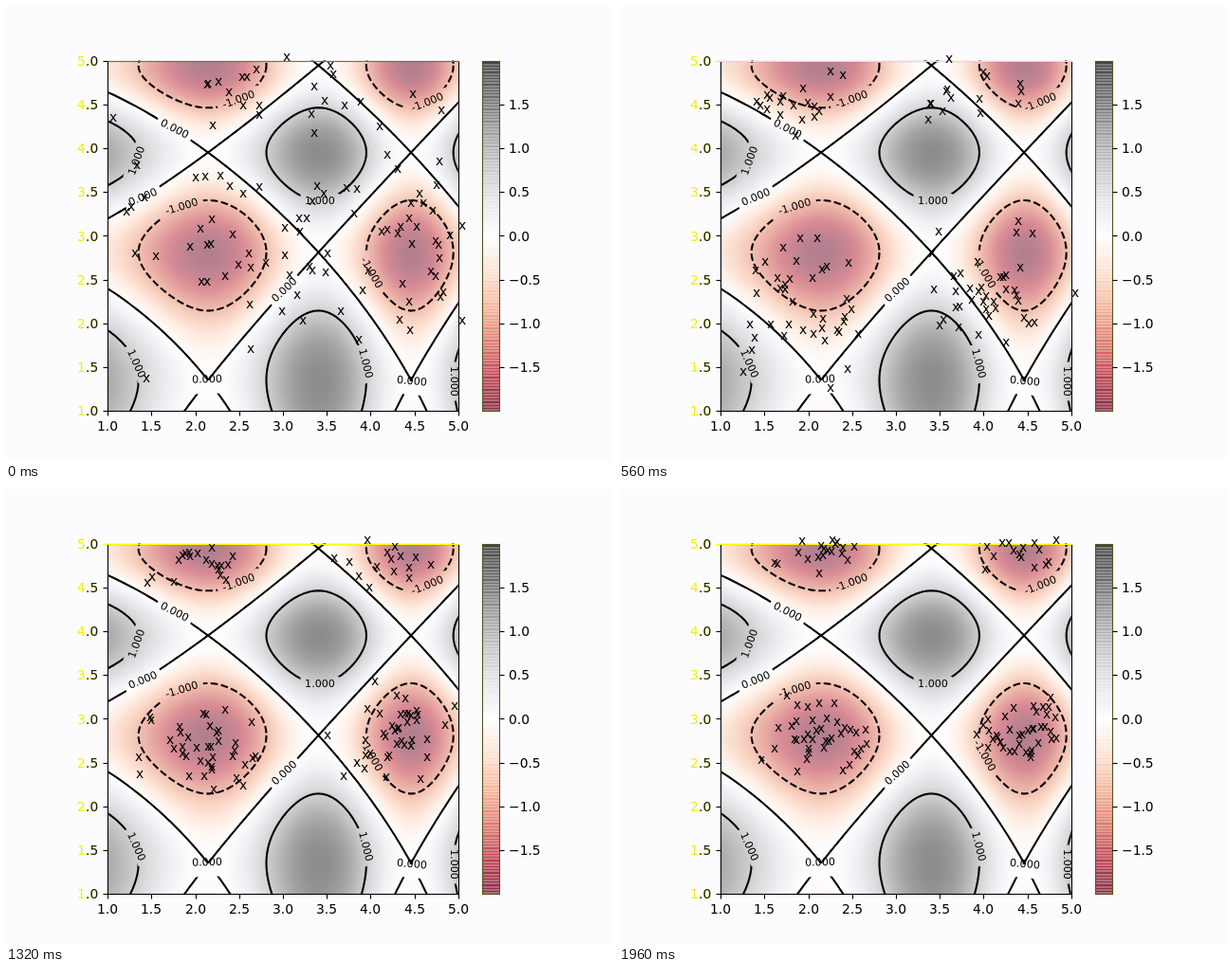
Write an HTML page with a canvas that moves like this. It is 640 px wide and 480 px high and loops after 2000 ms.

```html
<!DOCTYPE html>
<html lang="en">
<head>
<meta charset="utf-8">
<title>Swarm on a contour plot</title>
<style>
html, body { margin: 0; width: 100%; height: 100%; overflow: hidden; background: #fcfcff; }
canvas { position: absolute; left: 0; top: 0; }
</style>
</head>
<body>
<canvas id="plot" width="640" height="480"></canvas>
<canvas id="swarm" width="640" height="480"></canvas>
<script>
const g = document.getElementById('plot').getContext('2d');
const s = document.getElementById('swarm').getContext('2d');
const { PI, sin, cos, asin, floor, round, max, min, SQRT1_2 } = Math;
const FONT = '"DejaVu Sans", Verdana, sans-serif';
const LEFT = 107.2, TOP = 57.6, SIZE = 369.6, UNIT = SIZE / 4;
const px = x => LEFT + (x - 1) * UNIT;
const py = y => TOP + SIZE - (y - 1) * UNIT;
const lerp = (a, b, t) => a + (b - a) * t;

// Red to grey colour scale over -2..2
const stops = ['67001f', 'b2182b', 'd6604d', 'f4a582', 'fddbc7', 'ffffff',
  'e0e0e8', 'bababf', '878787', '4d4d4d', '1a1a1a']
  .map(h => [0, 2, 4].map(i => parseInt(h.slice(i, i + 2), 16)));
function shade(z) {
  const t = max(0, min(9.999, (z + 2) * 2.5)), i = floor(t);
  return stops[i].map((c, k) => lerp(c, stops[i + 1][k], t - i));
}

// z = cos(x^1.5) + sin(y^1.5)
function drawField() {
  const n = 370, img = g.createImageData(n, n);
  for (let j = 0, p = 0; j < n; j++) for (let i = 0; i < n; i++, p += 4) {
    const x = 1 + 4 * i / n, y = 5 - 4 * j / n;
    const c = shade(cos(x ** 1.5) + sin(y ** 1.5));
    for (let k = 0; k < 3; k++) img.data[p + k] = (c[k] + 254) / 2;
    img.data[p + 3] = 255;
  }
  g.putImageData(img, 107, 58);
}

// A curve given in u = x^1.5, v = y^1.5
function curve(from, to, uv) {
  g.beginPath();
  for (let i = 0; i <= 240; i++) {
    const [u, v] = uv(lerp(from, to, i / 240));
    g.lineTo(px(max(0, u) ** (2 / 3)), py(max(0, v) ** (2 / 3)));
  }
  g.stroke();
}

// text, x, y, degrees, shift of the gap in the line
const labels = [
  ['0.000', 178, 129, 27, 0], ['0.000', 144, 201, -23, 0], ['0.000', 293, 299, -43, 0],
  ['0.000', 212, 393, -2, 9], ['0.000', 428, 395, 5, 8],
  ['1.000', 137, 163, -70, 0], ['1.000', 331, 205, 0, 0], ['1.000', 138, 377, 66, 0],
  ['1.000', 380, 377, 76, 0], ['1.000', 473, 396, 90, 0],
  ['-1.000', 245, 98, -20, 0], ['-1.000', 444, 101, -22, 0],
  ['-1.000', 185, 211, -17, 0], ['-1.000', 386, 281, 60, 0]
];

function drawContours() {
  g.save();
  g.beginPath();
  g.rect(LEFT, TOP, SIZE, SIZE);
  g.clip();
  g.beginPath();
  g.rect(0, 0, 640, 480);
  for (const [text, x, y, deg, shift] of labels) {
    const w = text.length * 6 + 11;
    g.save();
    g.translate(x, y);
    g.rotate(deg * PI / 180);
    g.rect(-w / 2, shift - 7, w, 14);
    g.restore();
  }
  g.clip('evenodd');
  g.strokeStyle = '#000';
  g.lineWidth = 2.08;
  for (let k = 0; k < 5; k++) {
    curve(1, 11.3, u => [u, u - PI / 2 + 2 * PI * (k - 2)]);
    curve(1, 11.3, u => [u, -u - PI / 2 + 2 * PI * k]);
  }
  // Loops around the peaks (solid) and the basins (dashed)
  for (let a = 0; a < 5; a++) for (let b = a % 2; b < 4; b += 2) {
    g.setLineDash(a % 2 ? [7.7, 3.3] : []);
    curve(2 * PI, 0, t => [
      a * PI + 2 * asin(SQRT1_2 * cos(t)),
      (b + 0.5) * PI + 2 * asin(SQRT1_2 * sin(t))
    ]);
  }
  g.restore();

  g.fillStyle = '#000';
  g.font = '11.1px ' + FONT;
  g.textAlign = 'center';
  for (const [text, x, y, deg] of labels) {
    g.save();
    g.translate(x, y);
    g.rotate(deg * PI / 180);
    g.fillText(text, 0, 4.2);
    g.restore();
  }
}

function drawBar() {
  g.globalAlpha = 0.58;
  for (let i = 0; i < 256; i++) {
    g.fillStyle = `rgb(${shade(2 - i / 64).map(round)})`;
    g.fillRect(502, 58 + floor(i * SIZE / 256), 18, 2);
  }
  g.globalAlpha = 1;
}

function drawAxes() {
  const line = (x, y, dx, dy, colour = '#000') => {
    g.strokeStyle = colour;
    g.beginPath();
    g.moveTo(x, y);
    g.lineTo(x + dx, y + dy);
    g.stroke();
  };
  const text = (str, x, y, colour = '#000') => {
    g.fillStyle = colour;
    g.fillText(str, round(x), round(y));
  };
  g.lineWidth = 1.1;
  g.font = '13.89px ' + FONT;
  g.textAlign = 'left';
  g.strokeStyle = '#000';
  g.strokeRect(107.5, 58.5, 370, 369);
  line(107, 58.5, 371, 0, '#77771c');
  g.strokeStyle = '#55551c';
  g.strokeRect(502.5, 58.5, 18, 369);
  for (let v = 1; v <= 5; v += 0.5) {
    const label = v.toFixed(1), y = py(v) + 5.2;
    line(floor(px(v) + 0.5) + 0.5, 427.5, 0, 5);
    line(107.5, floor(py(v) + 0.5) + 0.5, -5, 0);
    text(label, px(v) - 11, 447.5);
    // The leading digit is yellow, the rest dark
    text(label, 75.4, y, '#f0f000');
    text(label.slice(1), 75.4 + g.measureText(label[0]).width, y, '#22220a');
  }
  for (let v = -1.5; v < 2; v += 0.5) {
    const y = TOP + SIZE / 2 - v * UNIT;
    line(520.5, floor(y + 0.5) + 0.5, 5, 0);
    text(v.toFixed(1).replace('-', '\u2212'), 530, y + 5.2);
  }
}

// Swarm: step, spread x, spread y, then the centre of each of four groups
const keys = [
  [0, 54, 52, 215, 260, 420, 258, 250, 108, 395, 125],
  [6, 38, 42, 310, 172, 425, 185, 270, 45, 470, 120],
  [14, 36, 36, 198, 308, 392, 300, 195, 108, 385, 92],
  [27, 27, 25, 228, 255, 435, 245, 238, 70, 425, 60],
  [33, 27, 27, 208, 270, 410, 265, 210, 78, 405, 76],
  [41, 23, 26, 232, 246, 437, 246, 235, 68, 440, 58],
  [49, 22, 21, 215, 262, 424, 254, 218, 69, 425, 66]
];

let seed = 7;
const rnd = () => (seed = seed * 16807 % 2147483647) / 2147483647;
const gauss = () => (rnd() + rnd() + rnd() + rnd() - 2) * 1.73;

const swarm = Array.from({ length: 112 }, (_, i) => {
  const group = i < 39 ? 0 : i < 78 ? 1 : i < 97 ? 2 : 3;
  const bx = gauss(), by = gauss();
  return keys.map(([, sx, sy, ...mid], k) => {
    const flat = group > 1 && k > 1 ? 0.5 : 1;
    return [
      mid[group * 2] + sx * (0.75 * bx + 0.66 * gauss()),
      mid[group * 2 + 1] + sy * flat * (0.75 * by + 0.66 * gauss())
    ];
  });
});

function drawSwarm(step) {
  s.clearRect(0, 0, 640, 480);
  if (step) {
    s.fillStyle = '#ff0';
    s.fillRect(102, 58, 376, 1);
  }
  s.fillStyle = '#000';
  s.font = '13.89px ' + FONT;
  const k = max(0, keys.findIndex(r => r[0] >= step) - 1);
  const t = (step - keys[k][0]) / (keys[k + 1][0] - keys[k][0]);
  const jitter = 3 * sin(PI * t);
  swarm.forEach((way, i) => {
    const [x, y] = [0, 1].map(c =>
      lerp(way[k][c], way[k + 1][c], t) + jitter * sin(step * 2.3 + i * 1.9 + c * 1.7));
    if (y > 30 && y < 424 && x > 110 && x < 500)
      s.fillText('x', round(min(481, x) - 4.1), round(max(54, y) + 3.8));
  });
}

drawField();
drawContours();
drawBar();
drawAxes();

const start = performance.now();
function frame() {
  drawSwarm(floor((performance.now() - start) % 2000 / 40));
  requestAnimationFrame(frame);
}
frame();
</script>
</body>
</html>
```
